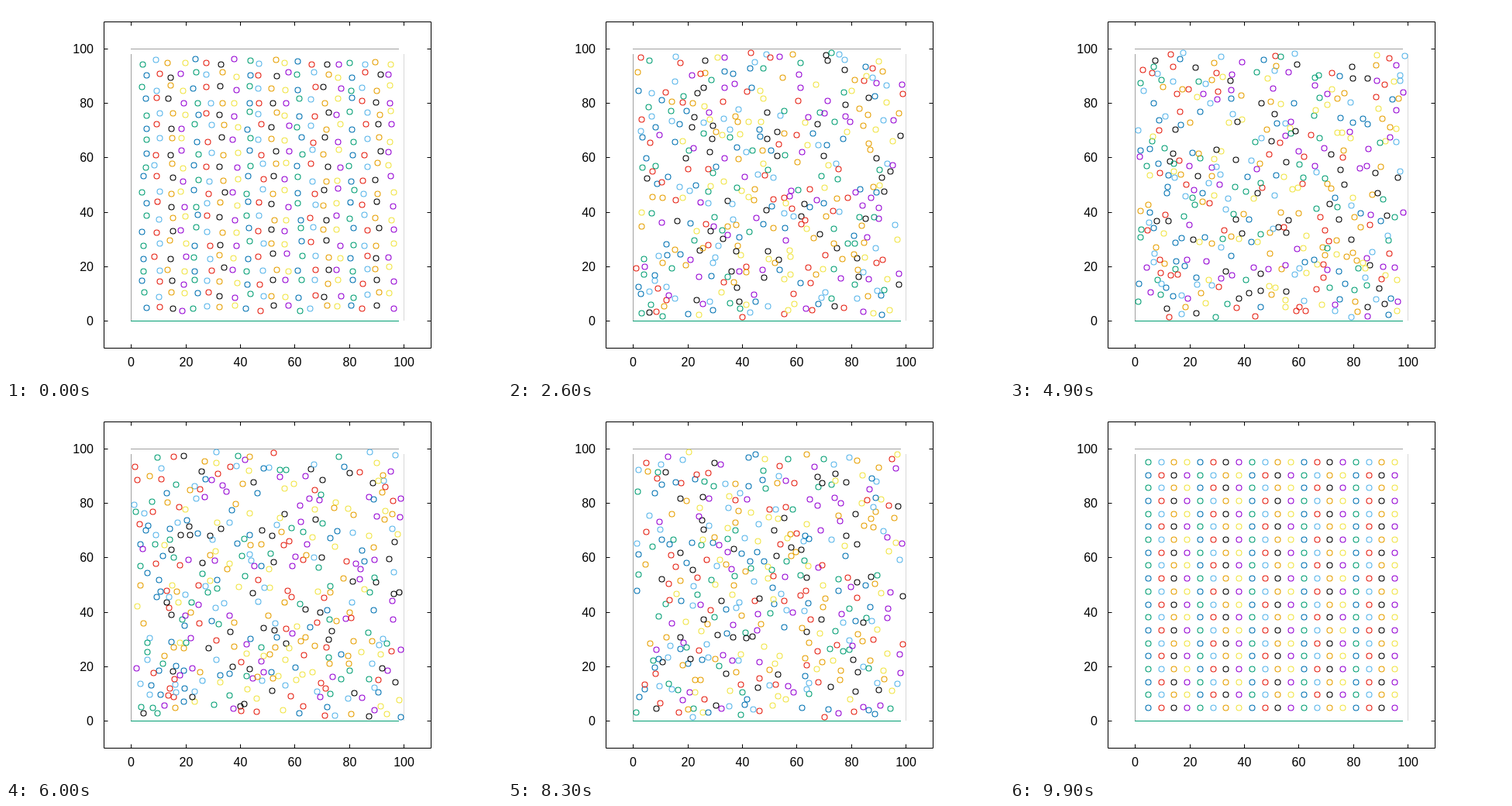
An HTML page for the animation above (10000 ms loop, 640x480 px).

```html
<!DOCTYPE html>
<html lang="en">
<head>
<meta charset="utf-8">
<title>Bouncing discs</title>
<style>
html, body { margin: 0; width: 100%; height: 100%; overflow: hidden; background: #fff; }
svg { display: block; }
text { font: 16px "Liberation Sans", Arial, sans-serif; }
</style>
</head>
<body>
<svg id="plot" width="640" height="480" viewBox="0 0 640 480" fill="none"></svg>
<script>
const plot = document.getElementById("plot");
const COLORS = ["#9400d3", "#009e73", "#56b4e9", "#e69f00", "#f0e442", "#0072b2", "#e51e10", "#000"];
const SIDE = 20, RADIUS = 1, BOX = 100;
const STEPS = 50, SUBSTEPS = 4, STEP_MS = 100;

const px = x => Math.round(161.2 + x * 3.517) + 0.5;
const py = y => Math.round(405.9 - y * 3.508) + 0.5;

function add(tag, attrs, text) {
  const node = document.createElementNS("http://www.w3.org/2000/svg", tag);
  for (const key in attrs) node.setAttribute(key, attrs[key]);
  if (text !== undefined) node.textContent = text;
  return plot.appendChild(node);
}
const line = (d, stroke) => add("path", { d, stroke });

function drawAxes() {
  for (let v = 0; v <= 100; v += 20) {
    const x = px(v), y = py(v);
    line(`M${x} 441.5v-5M${x} 20.5v5M126.5 ${y}h5M548.5 ${y}h-5`, "#000");
    add("text", { x, y: 465, "text-anchor": "middle", fill: "#000" }, v);
    add("text", { x: 113, y: y + 5, "text-anchor": "end", fill: "#000" }, v);
  }
  line("M161.5 62V406", "#a0a0a0");
  line("M161 55.5H507", "#a0a0a0");
  line("M513.5 62V406", "#d8d8d8");
  line("M161 406.5H507", "#009e73");
  line("M126.5 20.5H548.5V441.5H126.5Z", "#000");
}

function seeded(seed) {
  return () => {
    seed = (seed + 0x6d2b79f5) | 0;
    let t = Math.imul(seed ^ (seed >>> 15), seed | 1);
    t ^= t + Math.imul(t ^ (t >>> 7), t | 61);
    return ((t ^ (t >>> 14)) >>> 0) / 4294967296;
  };
}

function makeDiscs() {
  const random = seeded(7), gap = BOX / (SIDE + 1);
  return Array.from({ length: SIDE * SIDE }, (_, i) => {
    const angle = random() * 2 * Math.PI;
    return {
      x: gap * (i % SIDE + 1),
      y: gap * (Math.floor(i / SIDE) + 1),
      vx: Math.cos(angle),
      vy: Math.sin(angle)
    };
  });
}

// Equal masses: swap the velocity components along the line of centres.
function collide(a, b) {
  const dx = b.x - a.x, dy = b.y - a.y, d2 = dx * dx + dy * dy;
  if (d2 > 4 * RADIUS * RADIUS) return;
  const push = ((b.vx - a.vx) * dx + (b.vy - a.vy) * dy) / d2;
  if (push >= 0) return;
  a.vx += push * dx; a.vy += push * dy;
  b.vx -= push * dx; b.vy -= push * dy;
}

function bounce(d, pos, vel) {
  if (d[pos] < RADIUS) {
    d[pos] = 2 * RADIUS - d[pos];
    d[vel] = Math.abs(d[vel]);
  } else if (d[pos] > BOX - RADIUS) {
    d[pos] = 2 * (BOX - RADIUS) - d[pos];
    d[vel] = -Math.abs(d[vel]);
  }
}

function advance(discs) {
  for (const d of discs) {
    d.x += d.vx / SUBSTEPS;
    d.y += d.vy / SUBSTEPS;
    bounce(d, "x", "vx");
    bounce(d, "y", "vy");
  }
  for (let i = 0; i < discs.length; i++)
    for (let j = 0; j < i; j++) collide(discs[i], discs[j]);
}

function simulate() {
  const discs = makeDiscs(), states = [];
  for (let s = 0; s <= STEPS; s++) {
    states.push(discs.map(d => [px(d.x), py(d.y)]));
    for (let n = 0; n < SUBSTEPS; n++) advance(discs);
  }
  return states;
}

drawAxes();
const states = simulate();
const dots = states[0].map((_, i) => add("circle", { r: 3.5, stroke: COLORS[(i + 5) % 8], "stroke-width": 1.1 }));
let shown = -1;

// The discs scatter from the grid, then retrace their paths back to it.
function draw() {
  const tick = Math.floor(performance.now() / STEP_MS) % (2 * STEPS);
  const step = tick < STEPS ? tick + 1 : 2 * STEPS - 1 - tick;
  if (step !== shown) {
    shown = step;
    dots.forEach((dot, i) => {
      const [x, y] = states[step][i];
      dot.setAttribute("cx", x);
      dot.setAttribute("cy", y);
    });
  }
  requestAnimationFrame(draw);
}
draw();
</script>
</body>
</html>
```
